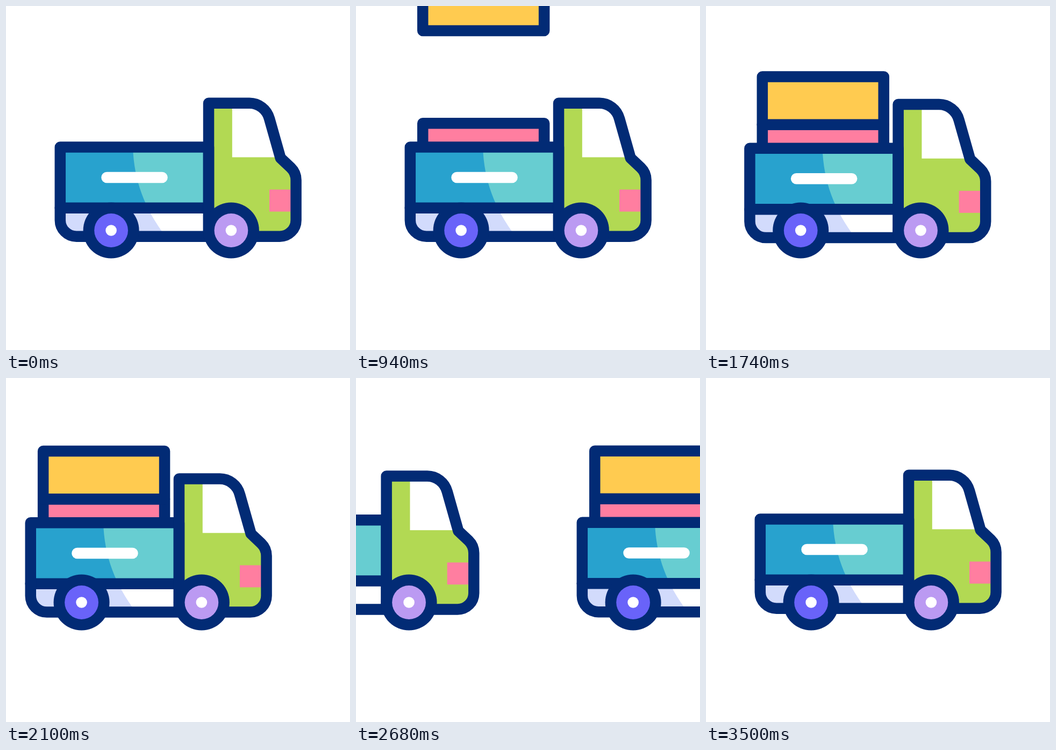
An HTML page with a canvas for the animation above (3600 ms loop, 640 px wide and 640 px high).

```html
<!DOCTYPE html>
<html lang="en">
<head>
<meta charset="utf-8">
<title>Truck loading</title>
<style>
  html, body { margin: 0; width: 100%; height: 100%; overflow: hidden; background: #fff; }
  canvas { display: block; width: 640px; height: 640px; }
</style>
</head>
<body>
<canvas id="stage" width="640" height="640"></canvas>
<script>
const ctx = document.getElementById('stage').getContext('2d');
const LOOP = 3600;
const LINE = 20.5;
const DIP = 8.2;
const INK = '#022b75', PINK = '#ff7ea0', YELLOW = '#ffcb50', GREEN = '#b2d953';
const TEAL = '#28a2ce', AQUA = '#67cdd1', PALE = '#d2dbfc';

const cab = new Path2D(
  'M377 428.7V180.7H453C470 180.7 485.5 192.5 490 209.7L510.7 282.7L529.8 300.8' +
  'C536 306.8 539.6 315.3 539.6 324V398.4C539.6 415.2 526 428.7 509.3 428.7Z');
const tray = new Path2D(
  'M377 262.4H100.8V398.4C100.8 415.2 114.3 428.7 131 428.7H377Z');
const shade = new Path2D('M90 262H236C238 325 258 377 297 428.7H90Z');

// Each track lists [time, value] keys with eased travel between them.
const tracks = {
  pinkLift: [[0, -330], [400, 0]],
  yellowLift: [[800, -241], [1200, 0]],
  loadedX: [[1600, 0], [2000, -68], [3200, 578]],
  loadedDip: [[400, 0], [600, DIP], [800, 0], [1200, 0], [1400, DIP], [1600, 0],
              [2000, DIP], [2400, 0], [2800, DIP], [3200, 0]],
  emptyX: [[2000, -571], [3483, 0]],
  emptyDip: [[2000, 0], [2400, DIP], [2800, 0], [3150, DIP], [3500, 0]]
};

function valueAt(keys, t) {
  if (t <= keys[0][0]) return keys[0][1];
  for (let i = 1; i < keys.length; i++) {
    const [t0, v0] = keys[i - 1], [t1, v1] = keys[i];
    if (t < t1) {
      const u = (t - t0) / (t1 - t0);
      return v0 + (v1 - v0) * u * u * (3 - 2 * u);
    }
  }
  return keys[keys.length - 1][1];
}

function rect(color, x, y, w, h) {
  ctx.fillStyle = color;
  ctx.fillRect(x, y, w, h);
}

function disc(color, x, y, r) {
  ctx.fillStyle = color;
  ctx.beginPath();
  ctx.arc(x, y, r, 0, 2 * Math.PI);
  ctx.fill();
}

function line(color, x0, y0, x1, y1) {
  ctx.strokeStyle = color;
  ctx.beginPath();
  ctx.moveTo(x0, y0);
  ctx.lineTo(x1, y1);
  ctx.stroke();
}

function within(path, paint) {
  ctx.save();
  ctx.clip(path);
  paint();
  ctx.restore();
}

function crate(color, y) {
  rect(color, 124.2, y, 225.9, 89.1);
  ctx.strokeStyle = INK;
  ctx.strokeRect(124.2, y, 225.9, 89.1);
}

function wheel(color, x) {
  disc(INK, x, 417.5, 52);
  disc(color, x, 417.5, 31.4);
  disc('#fff', x, 417.5, 10.3);
}

function body() {
  within(tray, () => {
    rect(AQUA, 90, 262, 290, 114);
    rect('#fff', 90, 376, 290, 54);
    within(shade, () => {
      rect(TEAL, 90, 262, 290, 114);
      rect(PALE, 90, 376, 290, 54);
    });
  });
  within(cab, () => {
    rect(GREEN, 370, 170, 180, 270);
    rect('#fff', 420.8, 170, 130, 111.4);
    rect(PINK, 490, 341.5, 60, 41);
  });
  line('#fff', 187.5, 319, 290.5, 319);
  line(INK, 100.8, 375.8, 377, 375.8);
  ctx.stroke(tray);
  ctx.stroke(cab);
}

function truck(x, dip, drawLoad) {
  ctx.save();
  ctx.translate(x, 0);
  ctx.save();
  ctx.translate(0, dip);
  if (drawLoad) drawLoad();
  body();
  ctx.restore();
  wheel('#6963f9', 195.6);
  wheel('#bb9af2', 418.9);
  ctx.restore();
}

function draw(t) {
  const at = name => valueAt(tracks[name], t);
  rect('#fff', 0, 0, 640, 640);
  ctx.lineWidth = LINE;
  ctx.lineJoin = ctx.lineCap = 'round';
  if (t < 3200) {
    truck(at('loadedX'), at('loadedDip'), () => {
      crate(PINK, 218.3 + at('pinkLift'));
      crate(YELLOW, 129.2 + at('yellowLift'));
    });
  }
  if (t > 2000) truck(at('emptyX'), at('emptyDip'));
}

const start = performance.now();
function tick() {
  draw((performance.now() - start) % LOOP);
  requestAnimationFrame(tick);
}
tick();
</script>
</body>
</html>
```
